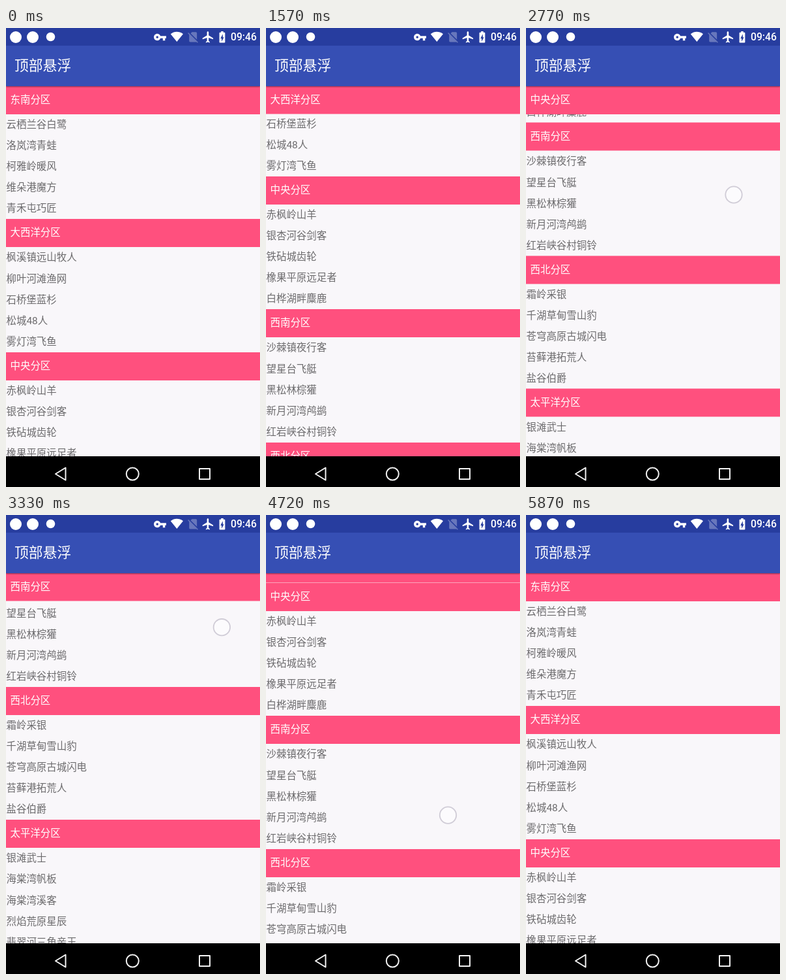
Write an HTML page that moves like this. It is 390 px wide and 702 px high and loops after 5.94 s.

```html
<!DOCTYPE html>
<html lang="zh-CN">
<head>
<meta charset="utf-8">
<title>顶部悬浮</title>
<style>
  html, body { margin: 0; width: 100%; height: 100%; overflow: hidden; background: #000; }
  body { font-family: Roboto, "Noto Sans CJK SC", "Noto Sans CJK", sans-serif; }
  #stage { position: relative; width: 390px; height: 702px; overflow: hidden; }
  #stage > * { position: absolute; left: 0; }
  .bar { top: 0; width: 390px; height: 89px; background: #364fb4; box-shadow: 0 1px 2px rgba(0, 0, 0, .45); }
  .bar::before { content: ""; position: absolute; width: 100%; height: 27px; background: #273d9f; }
  h1, h2, ul { margin: 0; padding: 0; font-weight: 400; list-style: none; }
  h1 { position: absolute; left: 13px; top: 27px; font-size: 21.8px; line-height: 62px; color: #fff; }
  time { position: absolute; left: 345px; top: 0; font-size: 15.7px; font-weight: 500; line-height: 28px; color: #fff; }
  .view { top: 89px; width: 390px; height: 566px; overflow: hidden; background: #f9f7fa; }
  h2, li { font-size: 15.45px; white-space: nowrap; }
  h2 { position: relative; z-index: 1; height: 43px; line-height: 43px; padding-left: 6.5px; background: #ff507e; color: #fff; }
  li { height: 32.1px; line-height: 32.1px; padding-left: .5px; color: #6c6b6d; }
  svg { top: 0; }
</style>
</head>
<body>
<div id="stage">
  <div class="view"><div id="list"></div></div>
  <div class="bar"><h1>顶部悬浮</h1><time>09:46</time></div>
  <svg width="390" height="702" viewBox="0 0 390 702">
    <g fill="#fff">
      <circle cx="15" cy="14" r="9"/>
      <circle cx="41" cy="14" r="9"/>
      <circle cx="68.5" cy="13.5" r="6.8"/>
      <path transform="translate(226.2 3.7) scale(.86)" d="M12.65 10C11.83 7.67 9.61 6 7 6c-3.31 0-6 2.69-6 6s2.69 6 6 6c2.61 0 4.83-1.67 5.65-4H17v4h4v-4h2v-4zM7 14c-1.1 0-2-.9-2-2s.9-2 2-2 2 .9 2 2-.9 2-2 2z"/>
      <path transform="translate(252.5 3.4) scale(.82)" d="M12 21.5L23.64 7C23.2 6.66 18.7 3 12 3S.81 6.66.36 7z"/>
      <path opacity=".3" transform="translate(277 3.6) scale(.85)" d="M19 5c0-1.1-.9-2-2-2h-7L7.66 5.34 19 16.68zM3.65 3.88L2.38 5.15 5 7.77V19c0 1.1.9 2 2 2h10c.35 0 .67-.1.96-.26l1.88 1.88 1.27-1.27z"/>
      <path transform="translate(300 3.5) scale(.86)" d="M21 16v-2l-8-5V3.5C13 2.67 12.33 2 11.5 2S10 2.67 10 3.5V9l-8 5v2l8-2.5V19l-2 1.5V22l3.5-1 3.5 1v-1.5L13 19v-5.5z"/>
      <path transform="translate(321.4 3.2) scale(.88)" d="M15.67 4H14V2h-4v2H8.33C7.6 4 7 4.6 7 5.33v15.33C7 21.4 7.6 22 8.33 22h7.33c.74 0 1.34-.6 1.34-1.33V5.33C17 4.6 16.4 4 15.67 4zM11 20v-5.5H9L13 7v5.5h2z"/>
    </g>
    <path d="M0 655h390v47H0z"/>
    <g fill="none" stroke="#f2f2f2" stroke-width="2" stroke-linejoin="round">
      <path d="M76 682l15.500-9.500v19z"/>
      <circle cx="194.300" cy="682" r="9.500"/>
      <path d="M297 674h16v16h-16z"/>
    </g>
    <g id="touch">
      <circle r="12" fill="#fff" fill-opacity=".55"/>
      <circle r="12.700" fill="none" stroke="#a8a2b4" stroke-opacity=".5" stroke-width="1.800"/>
    </g>
  </svg>
</div>
<script>
const LOOP = 5940, HEAD = 43, SECTION = 203.5;

const groups = {
  东南分区: "云栖兰谷白鹭 洛岚湾青蛙 柯雅岭暖风 维朵港魔方 青禾屯巧匠",
  大西洋分区: "枫溪镇远山牧人 柳叶河滩渔网 石桥堡蓝杉 松城48人 雾灯湾飞鱼",
  中央分区: "赤枫岭山羊 银杏河谷剑客 铁砧城齿轮 橡果平原远足者 白桦湖畔麋鹿",
  西南分区: "沙棘镇夜行客 望星台飞艇 黑松林棕獾 新月河湾鸬鹚 红岩峡谷村铜铃",
  西北分区: "霜岭采银 千湖草甸雪山豹 苍穹高原古城闪电 苔藓港拓荒人 盐谷伯爵",
  太平洋分区: "银滩武士 海棠湾帆板 海棠湾溪客 烈焰荒原星辰 翡翠河三角亲王"
};

// Screen refreshes: first time, last time, count
const bursts = [
  [0, 0, 1], [400, 400, 1], [620, 1180, 8], [1260, 1850, 9],
  [1950, 2180, 4], [2260, 2490, 4], [2560, 2770, 4], [2870, 3100, 4],
  [3180, 3720, 8], [3790, 4180, 6], [4330, 4870, 8],
  [4950, 5020, 2], [5100, 5480, 6], [5560, 5870, 5]
];

const scrollKeys = [
  [540, 0], [1100, 120.5], [1500, 255], [1850, 325], [1950, 331], [2180, 363],
  [2770, 554.5], [3300, 643], [3650, 655], [4330, 655], [5020, 138.5], [5480, 0]
];

// Each drag: time, x, y
const drags = [
  [[400, 278, 538], [620, 278, 522], [1100, 277, 408], [1520, 285, 270]],
  [[1900, 252, 478], [2180, 264, 441], [2770, 319, 255], [3300, 332, 168], [3500, 334, 158]],
  [[4170, 283, 160], [4330, 283, 166], [5020, 277, 665], [5180, 277, 670]]
];

const list = document.getElementById("list");
const touch = document.getElementById("touch");

const add = (parent, tag, text = "") => {
  const el = parent.appendChild(document.createElement(tag));
  el.textContent = text;
  return el;
};

const heads = Object.entries(groups).map(([title, names]) => {
  const head = add(list, "h2", title);
  const ul = add(list, "ul");
  names.split(" ").forEach(name => add(ul, "li", name));
  return head;
});

const clamp = (v, lo, hi) => Math.min(hi, Math.max(lo, v));

function refreshTime(t) {
  const [start, end, count] = bursts.findLast(b => b[0] <= t);
  if (count === 1) return start;
  const step = (end - start) / (count - 1);
  return start + step * Math.min(count - 1, Math.floor((t - start) / step + 1e-6));
}

// Monotone cubic interpolation of column c
function track(keys, t, c = 1) {
  const last = keys.length - 1;
  t = clamp(t, keys[0][0], keys[last][0]);
  const slope = i => (keys[i + 1][c] - keys[i][c]) / (keys[i + 1][0] - keys[i][0]);
  const tangent = i => {
    if (i === 0) return slope(0);
    if (i === last) return slope(last - 1);
    const a = slope(i - 1), b = slope(i);
    return a * b > 0 ? 2 * a * b / (a + b) : 0;
  };
  let i = 0;
  while (i < last - 1 && t >= keys[i + 1][0]) i++;
  const w = keys[i + 1][0] - keys[i][0], u = (t - keys[i][0]) / w, v = 1 - u;
  return keys[i][c] * (1 + 2 * u) * v * v + keys[i + 1][c] * u * u * (3 - 2 * u)
    + w * u * v * (tangent(i) * v - tangent(i + 1) * u);
}

function draw(now) {
  const t = refreshTime(now % LOOP);
  const scroll = Math.round(track(scrollKeys, t) * 2) / 2;
  list.style.transform = `translateY(${-scroll}px)`;
  heads.forEach((head, i) => {
    head.style.transform = `translateY(${clamp(scroll - i * SECTION, 0, SECTION - HEAD)}px)`;
  });

  const drag = drags.find(d => t >= d[0][0] && t <= d[d.length - 1][0]);
  touch.style.display = drag ? "" : "none";
  if (drag) touch.setAttribute("transform", `translate(${track(drag, t, 1)} ${track(drag, t, 2)})`);
  requestAnimationFrame(() => draw(performance.now()));
}
draw(0);
</script>
</body>
</html>
```
